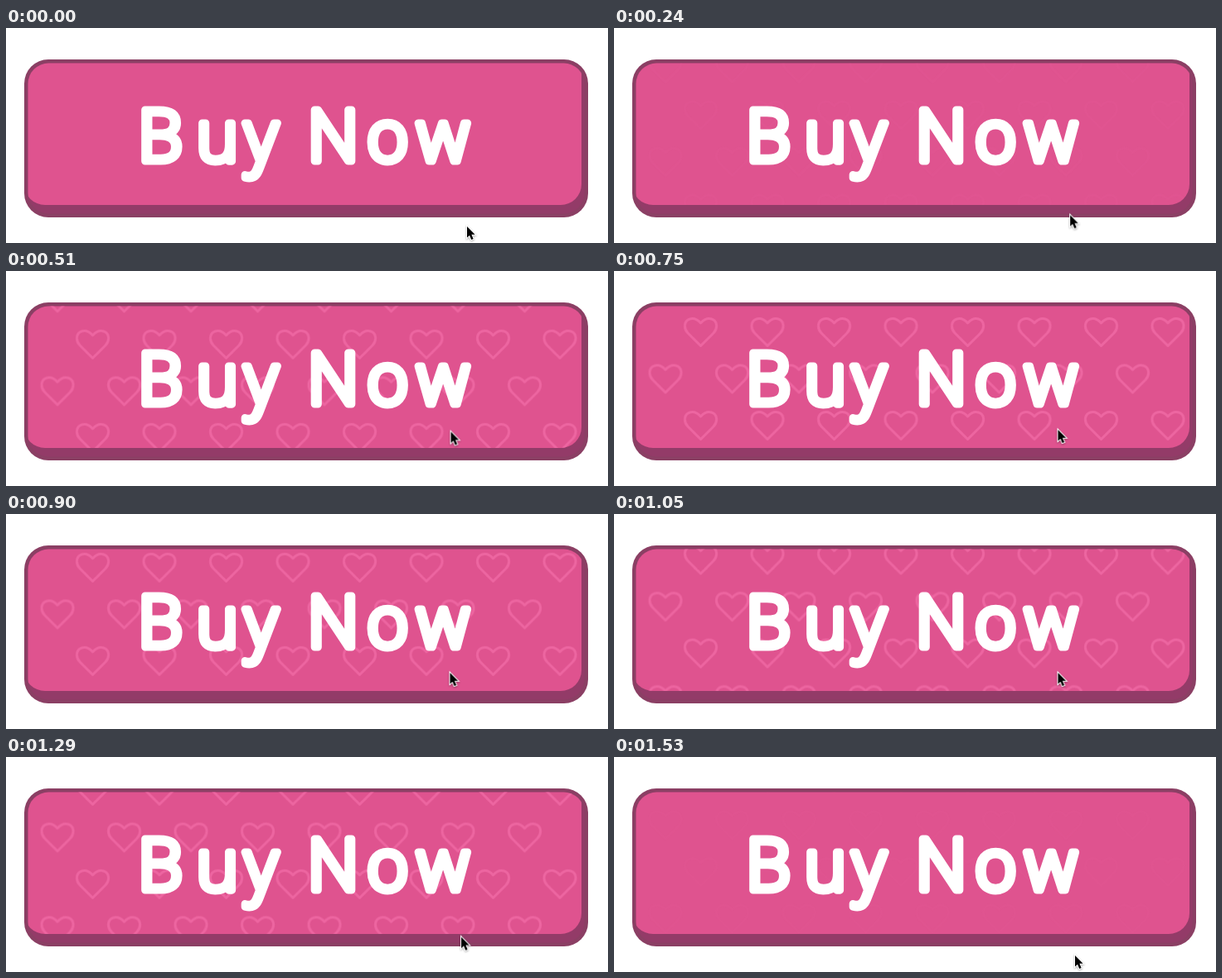
Recreate the animation shown at these times as an HTML page without scripts. Size 726 px wide and 260 px high, loop 1.56 s.

```html
<!DOCTYPE html>
<html lang="en">
<head>
<meta charset="utf-8">
<title>Buy Now button</title>
<style>
  html, body { margin: 0; width: 100%; height: 100%; overflow: hidden; background: #fff; }
  svg { display: block; width: 726px; height: 260px; }

  .label {
    font: 300 86px "Open Sans", "Noto Sans", sans-serif;
    fill: #fff;
    stroke: #fff;
    stroke-width: 9;
    stroke-linejoin: round;
  }
  .heart { fill: none; stroke: #ed66a1; stroke-width: 3; stroke-linejoin: round; }
  .arrow {
    stroke: #fff;
    stroke-width: 2;
    paint-order: stroke;
    filter: drop-shadow(0 1px 1px #0005);
  }

  .hover, .drift, .cursor { animation: 1560ms linear infinite; }
  .hover { animation-name: hover; }
  .drift { animation-name: drift; }
  .cursor { animation-name: cursor; }

  @keyframes hover {
    0%, 13.8% { opacity: 0; }
    30.1%, 86.5% { opacity: 1; }
    99%, 100% { opacity: 0; }
  }
  @keyframes drift {
    from { transform: translateY(102.2px); }
    to { transform: translateY(6.2px); }
  }
  @keyframes cursor {
    0%, 1.9% { transform: translate(556px, 240px); animation-timing-function: ease-in-out; }
    38.5% { transform: translate(535.5px, 192px); }
    69.2% { transform: translate(535.5px, 192px); animation-timing-function: ease-in; }
    82.7% { transform: translate(549px, 217.5px); animation-timing-function: ease-out; }
    96.2%, 100% { transform: translate(556px, 240px); }
  }
</style>
</head>
<body>
<svg viewBox="0 0 726 260">
  <defs>
    <pattern id="hearts" width="80.5" height="113" patternUnits="userSpaceOnUse">
      <path class="heart" transform="translate(40.25)" d="M0 34.5 L-15.5 19 C-21 13 -20 4 -13 2 C-8 .5 -4 2.5 0 7 C4 2.5 8 .5 13 2 C20 4 21 13 15.5 19 Z"/>
    </pattern>
    <rect id="rows" y="-226" width="644" height="565" fill="url(#hearts)"/>
    <clipPath id="inside"><rect x="26.5" y="42.5" width="671" height="182" rx="25"/></clipPath>
    <clipPath id="face"><rect x="22" y="31" width="672" height="183" rx="25"/></clipPath>
  </defs>

  <rect x="22" y="38" width="680" height="191" rx="29" fill="#8b3f64"/>
  <g clip-path="url(#inside)">
    <rect x="26" y="42" width="672" height="183" fill="#933b68"/>
    <g clip-path="url(#face)">
      <rect x="22" y="31" width="672" height="183" fill="#df538f"/>
      <g class="hover">
        <g class="drift">
          <use href="#rows" x="64.25"/>
          <use href="#rows" x="21.75" y="56.5"/>
        </g>
      </g>
    </g>
  </g>

  <text class="label" x="159 229.5 288 331 363.5 435 495.7" y="160.7">Buy Now</text>

  <g class="cursor">
    <path class="arrow" d="M0 0 V13.5 L3 10.8 L5.2 16 L7.6 15 L5.4 9.8 H9.6 Z"/>
  </g>
</svg>
</body>
</html>
```
